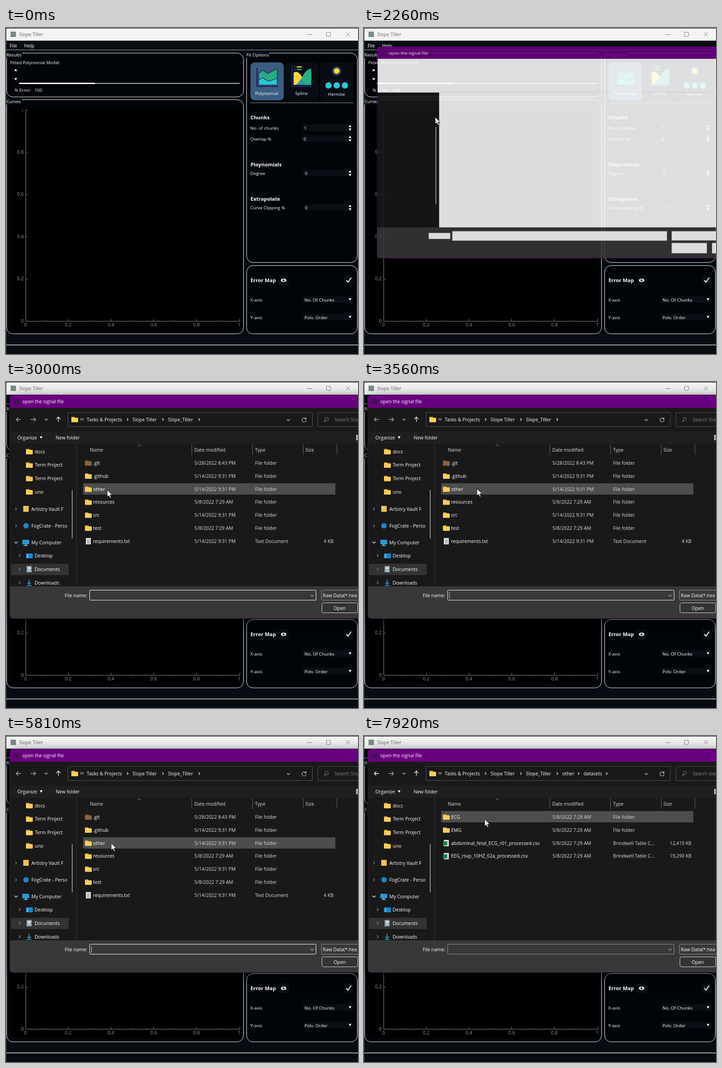
Animation, 776 px wide and 721 px high, one loop 8 s. Source, as an HTML page with a canvas:

```html
<!DOCTYPE html>
<html lang="en">
<head>
<meta charset="utf-8">
<title>Slope Tiller</title>
<style>
html, body { margin: 0; width: 100%; height: 100%; overflow: hidden; background: #080c13; }
canvas { display: block; }
</style>
</head>
<body>
<canvas id="stage" width="776" height="721"></canvas>
<script>
const ctx = document.getElementById('stage').getContext('2d');
const LOOP = 8000, WHITE = '#fff', PURPLE = '#69007f', APP = '#080c13', PANEL = '#010409';
const APP_NAME = 'Slope Tiller';
const clamp = v => Math.max(0, Math.min(1, v));

function rect(x, y, w, h, fill) { ctx.fillStyle = fill; ctx.fillRect(x, y, w, h); }

function round(x, y, w, h, r, fill, stroke) {
  ctx.beginPath();
  ctx.roundRect(x, y, w, h, r);
  if (fill) { ctx.fillStyle = fill; ctx.fill(); }
  if (stroke) { ctx.strokeStyle = stroke; ctx.lineWidth = 1; ctx.stroke(); }
}

function circle(x, y, r, fill) {
  ctx.beginPath();
  ctx.arc(x, y, r, 0, 7);
  ctx.fillStyle = fill;
  ctx.fill();
}

// Points come as a flat list: x, y, x, y, ...
function trace(points) {
  ctx.beginPath();
  for (let i = 0; i < points.length; i += 2) ctx.lineTo(points[i], points[i + 1]);
}
function line(points, color = WHITE, width = 1) {
  trace(points);
  ctx.strokeStyle = color;
  ctx.lineWidth = width;
  ctx.stroke();
}
function shape(points, fill) { trace(points); ctx.closePath(); ctx.fillStyle = fill; ctx.fill(); }

// y is the middle of the capitals
function text(str, x, y, size = 9.8, color = WHITE, align = 'left', weight = 500) {
  ctx.font = `${weight} ${size}px "Open Sans", "Noto Sans", sans-serif`;
  ctx.textAlign = align;
  ctx.fillStyle = color;
  ctx.fillText(str, x, Math.round(y + size * 0.36));
}
const label = (str, x, y, color = WHITE, align) => text(str, x, y, 10.4, color, align);

function triangle(x, y, up, r = 3) {
  const d = up ? -r : r;
  shape([x - r, y - d / 1.4, x + r, y - d / 1.4, x, y + d], WHITE);
}
const chevronRight = (x, y, color, r = 3) => line([x - r / 2, y - r, x + r / 2, y, x - r / 2, y + r], color, 1.2);
const chevronDown = (x, y, color, r = 3.5) => line([x - r, y - r / 2, x, y + r / 2, x + r, y - r / 2], color, 1.2);

/* ---------- main window ---------- */

function group(x, y, w, h, title, gap) {
  round(x + 0.5, y + 0.5, w, h, 14, PANEL, '#f0f0f0');
  if (!title) return;
  rect(x - 1, y - 1, gap, 12, APP);
  text(title, x, y + 4);
}

function heading(str, y) { text(str, 539, y, 11.3, WHITE, 'left', 700); }

function spin(name, value, x, y) {
  text(name, 538.5, y);
  round(x, y - 8, 766 - x, 15, 3, '#0a0f15');
  text(value, x + 4, y);
  triangle(758.5, y - 4, true);
  triangle(758.5, y + 3.5, false);
}

function combo(name, value, y) {
  text(name, 538.5, y);
  round(654, y - 8, 112, 15, 3, '#0a0f15');
  text(value, 658, y);
  triangle(758.5, y - 1, false);
}

function titleBar(focused) {
  const ink = focused ? WHITE : '#777';
  rect(0, 1, 776, 27, focused ? PURPLE : '#f3f3f3');
  rect(10, 8, 12, 12, focused ? '#3c1550' : '#7d8a8c');
  label(APP_NAME, 29, 14.5, focused ? WHITE : '#666');
  line([664, 14.5, 675, 14.5], ink);
  round(706.5, 9.5, 9, 9, 1, null, ink);
  line([749, 9.5, 758, 18.5], ink);
  line([758, 9.5, 749, 18.5], ink);
}

function polynomialIcon() {
  const navy = '#241c52';
  shape([557, 101, 565, 93, 577, 101, 598, 90, 598, 111, 579, 118, 566, 110, 557, 115], '#26ad83');
  shape([557, 115, 566, 110, 579, 118, 598, 111, 598, 126, 557, 126], '#27c8d2');
  line([557, 101, 565, 93, 577, 101, 598, 90, 598, 126, 557, 126, 557, 101], navy, 1.2);
  line([557, 115, 566, 110, 579, 118, 598, 111], navy, 1.2);
  line([553.5, 88, 553.5, 129, 600, 129], navy, 2.5);
}

function splineIcon() {
  ctx.beginPath();
  ctx.moveTo(634, 126);
  ctx.lineTo(634, 99);
  ctx.bezierCurveTo(644, 92, 652, 104, 661, 126);
  ctx.fillStyle = '#fdd835';
  ctx.fill();
  ctx.save();
  ctx.clip();
  ctx.restore();
  const hill = new Path2D('M636 126 C655 122 652 92 673 90 V126 Z');
  ctx.fillStyle = '#26ad83';
  ctx.fill(hill);
  shape([640, 126, 651, 112, 661, 126], '#2397b0');
  line([630.5, 84, 630.5, 129, 675, 129], '#2b2064', 2.5);
  [['#fdd835', 86], ['#26ad83', 92]].forEach(([color, y]) => {
    line([641, y, 652, y], color, 2.5);
    line([635, y, 638, y], '#55506f', 2.5);
  });
}

function hermiteIcon() {
  for (const x of [711, 729, 747]) line([729, 100, x, 122], '#12152c', 1.2);
  circle(729, 95, 10, '#31527c');
  circle(729, 95, 8, '#241c52');
  circle(729, 95, 6.5, '#fdd835');
  for (const x of [711, 729, 747]) {
    circle(x, 127, 7.5, '#17465b');
    circle(x, 127, 6.7, '#27c8d2');
  }
}

function fitButtons() {
  round(539, 76, 73.5, 84, 9, '#3b5d82');
  round(615, 76, 74, 84, 9, '#080d14');
  round(692.5, 76, 73.5, 84, 9, '#080d14');
  text('Polynomial', 574.5, 144, 9.8, WHITE, 'center');
  text('Spline', 651.5, 144, 9.8, WHITE, 'center');
  text('Hermite', 728.5, 146, 9.8, WHITE, 'center');
  polynomialIcon();
  splineIcon();
  hermiteIcon();
  line([539, 165.5, 766, 165.5], '#999');
}

function plot() {
  const axis = '#8c8c8c', ink = '#9a929c';
  rect(12, 179, 504, 488, '#000');
  line([48, 181.5, 43.5, 181.5, 43.5, 648.5, 515.5, 648.5, 515.5, 643], axis);
  for (let i = 1; i < 10; i++) {
    const x = Math.round(43 + 47 * i) + 0.5, y = Math.round(648 - 46.7 * i) + 0.5;
    const color = i % 2 ? '#3a3a3a' : '#777';
    line([43, y, i % 2 ? 46 : 48, y], color);
    line([x, 648, x, i % 2 ? 645 : 643], color);
  }
  for (let i = 0; i <= 4; i++) {
    const str = i ? '0.' + 2 * i : '0';
    text(str, 39, 648 - i * 93.5, 10.5, ink, 'right');
    text(str, 43 + i * 94.2, 656, 10.5, ink, 'center');
  }
  ctx.save();
  ctx.beginPath();
  ctx.rect(15, 180, 500, 480);
  ctx.clip();
  text('1', 39, 181.5, 10.5, ink, 'right');
  text('1', 514, 656, 10.5, ink, 'center');
  ctx.restore();
}

function mainWindow(focused, fileHover, menuAlpha) {
  rect(0, 0, 776, 721, APP);
  titleBar(focused);
  if (fileHover) rect(1, 29, 31, 19, WHITE);
  label('File', 8, 39);
  label('Help', 40, 39);
  line([0, 48.5, 776, 48.5], '#a8aaad');

  group(1, 55, 522, 97, 'Results', 36);
  text('Fitted Polynomial Model:', 9.5, 77, 9.5);
  triangle(21.5, 93, true);
  triangle(21.5, 113, false);
  rect(29, 121, 167, 3, WHITE);
  rect(196, 121, 319, 3, '#6b6d70');
  ctx.setLineDash([1, 1]);
  line([196, 122.5, 515, 122.5], '#d0d0d0');
  ctx.setLineDash([]);
  text('% Error:', 19, 137);
  text('100', 63, 137);

  group(1, 158, 522, 518, 'Curves', 35);
  plot();

  group(530, 55, 244, 463, 'Fit Options', 51);
  fitButtons();
  heading('Chunks', 197.5);
  spin('No. of chunks', '1', 653, 221);
  spin('Overlap %', '0', 652, 245);
  heading('Ploynomials', 301.5);
  spin('Degree', '0', 655, 321.5);
  heading('Extrapolate', 377.5);
  spin('Curve Clipping %', '0', 655, 397.5);

  group(530, 525, 244, 151);
  heading('Error Map', 558);
  round(600.5, 547, 23, 22, 3, '#0a0f15');
  ctx.beginPath();
  ctx.ellipse(612, 558, 6, 3.8, 0, 0, 7);
  ctx.fillStyle = WHITE;
  ctx.fill();
  circle(612, 558, 2.4, '#0a0f15');
  circle(612.8, 557.2, 0.9, WHITE);
  round(745, 547, 21, 21, 3, '#0a0f15');
  line([750, 558, 754, 562, 761, 552], WHITE, 2);
  combo('X-axis', 'No. Of Chunks', 601);
  combo('Y-axis', 'Polv. Order', 640);

  line([0, 701, 776, 701], '#d8d8d8', 1.5);
  line([0.5, 0, 0.5, 721], focused ? PURPLE : '#3a3d42');

  if (menuAlpha > 0) {
    ctx.globalAlpha = menuAlpha;
    rect(1, 49, 83, 26, APP);
    line([33, 48.5, 84, 48.5], '#333');
    label('Open', 20, 62);
    ctx.globalAlpha = 1;
  }
}

/* ---------- file dialog ---------- */

function folder(x, y, dim) {
  round(x, y - 6, 8, 5, 1, dim ? '#6e4a28' : '#e3a82b');
  round(x, y - 4, 15, 10, 1.5, dim ? '#8a6140' : '#fccf54');
}

function page(x, y) {
  rect(x, y - 7, 11, 14, '#e6e6e6');
  for (let i = -4; i < 6; i += 2) line([x + 2, y + i + 0.5, x + 9, y + i + 0.5], '#8c8c8c');
}

function sheet(x, y) {
  page(x + 2, y);
  rect(x, y - 4, 9, 9, '#17834a');
}

const SPRING = '5/14/2022 9:31 PM', EARLY = '5/8/2022 7:29 AM';
const dir = (name, date, dim) => ({ name, date, type: 'File folder', icon: (x, y) => folder(x, y, dim) });
const csv = (name, size) => ({ name, date: EARLY, type: 'Brindwell Table C...', size, icon: sheet });
const LISTINGS = [
  [dir('.git', '5/28/2022 8:43 PM', true), dir('.github', SPRING), dir('other', SPRING),
    dir('resources', EARLY), dir('src', SPRING), dir('test', EARLY),
    { name: 'requirements.txt', date: SPRING, type: 'Text Document', size: '4 KB', icon: (x, y) => page(x + 2, y) }],
  [dir('datasets', EARLY)],
  [dir('ECG', EARLY), dir('EMG', EARLY),
    csv('abdominal_fetal_ECG_r01_processed.csv', '12,419 KB'),
    csv('EEG_rsvp_10HZ_02a_processed.csv', '19,290 KB')]
];
const CRUMBS = [['Tasks & Projects', 178, 268], [APP_NAME, 279, 346], ['Slope_Tiller', 357, 426],
  ['other', 437, 473], ['datasets', 484, 535]];

function sidebar() {
  ctx.save();
  ctx.beginPath();
  ctx.rect(9, 137, 129, 315);
  ctx.clip();
  rect(11, 402, 127, 25, '#333');
  ['docs', 'Term Project', 'Term Project', 'uno'].forEach((name, i) => {
    folder(44, 154 + i * 29.7, false);
    label(name, 63.5, 154 + i * 29.7);
  });
  const gray = '#8a8a8a';
  chevronRight(22, 281, gray);
  chevronRight(22, 318, gray);
  chevronDown(22, 355, WHITE);
  for (const y of [384, 414, 444]) chevronRight(30, y, gray);

  rect(38, 274, 12, 13, '#f2c34e');
  label('Artistry Vault F', 56, 281);
  circle(44, 318, 6, '#1687d0');
  label('FogCrate - Perso', 56, 318);
  rect(36, 349, 15, 10, '#2b9ad6');
  rect(42, 359, 3, 2, '#79bfe3');
  rect(39, 361, 9, 1.5, '#79bfe3');
  label('My Computer', 56, 355);
  round(44, 379, 15, 11, 1, '#1b86c6');
  rect(46, 382, 3, 2, '#9bdcf7');
  rect(46, 386, 3, 2, '#9bdcf7');
  label('Desktop', 63, 384.5);
  rect(45.5, 407, 11, 14, '#93a9b8');
  rect(48, 410, 6, 3, '#e9f3f8');
  line([48, 416.5, 54, 416.5], WHITE);
  label('Documents', 63, 414.5);
  line([51, 437, 51, 447], '#35a6dc', 1.6);
  line([47, 443.5, 51, 447.5, 55, 443.5], '#35a6dc', 1.6);
  line([45.5, 450, 56.5, 450], '#35a6dc', 1.6);
  label('Downloads', 63, 444);
  ctx.restore();
  rect(145, 239, 2, 107, '#8c8c8c');
}

function addressBar(level) {
  const mute = '#888', back = level ? WHITE : '#aaa';
  line([33, 83, 22.5, 83], back, 1.3);
  line([27, 78.5, 22.5, 83, 27, 87.5], back, 1.3);
  line([54.5, 83, 65.5, 83], '#aaa', 1.3);
  line([61, 78.5, 65.5, 83, 61, 87.5], '#aaa', 1.3);
  chevronDown(88.5, 83, '#ccc');
  line([115.5, 88, 115.5, 77.5], WHITE, 1.3);
  line([111, 82, 115.5, 77.5, 120, 82], WHITE, 1.3);

  round(136.5, 67.5, 539, 31, 1, '#191919', '#555');
  folder(144, 83, false);
  chevronRight(165.5, 82.5, '#aaa', 2.5);
  chevronRight(169.5, 82.5, '#aaa', 2.5);
  CRUMBS.slice(0, 3 + level).forEach(([name, x, arrow]) => {
    label(name, x, 83);
    chevronRight(arrow, 83, WHITE, 2.7);
  });
  chevronDown(622.5, 84, '#ccc');
  ctx.beginPath();
  ctx.arc(657, 84, 4.5, 0, 5.3);
  ctx.strokeStyle = '#ddd';
  ctx.lineWidth = 1.2;
  ctx.stroke();
  shape([657.5, 82, 662, 82, 662, 78], '#ddd');

  round(687.5, 67.5, 110, 31, 1, '#191919', '#555');
  ctx.beginPath();
  ctx.arc(707, 82, 3.7, 0, 7);
  ctx.strokeStyle = mute;
  ctx.stroke();
  line([704.5, 85, 701, 89], mute, 1.2);
  label('Search ' + ['Slope_Tiller', 'other', 'datasets'][level], 724.5, 83, mute);
}

function fileList(level, pointer) {
  line([290.5, 141.5, 294, 138.5, 297.5, 141.5], '#999');
  [['Name', 185], ['Date modified', 415], ['Type', 549], ['Size', 660]].forEach(([name, x]) => label(name, x, 150, '#ddd'));
  for (const x of [409.5, 543.5, 655.5, 729.5]) line([x, 138, x, 161], '#666');
  LISTINGS[level].forEach((file, i) => {
    const y = 179.3 + i * 28.8;
    const over = pointer.x > 170 && pointer.x < 726 && Math.abs(pointer.y - y) < 13;
    if (over) rect(170, Math.round(y - 13), 556, 25, '#4d4d4d');
    file.icon(174, y);
    label(file.name, 192, y);
    label(file.date, 415.5, y, '#ddd');
    label(file.type, 549, y, '#ddd');
    if (file.size) label(file.size, 722, y, '#ddd', 'right');
  });
}

function dialogFooter(t) {
  rect(9, 452, 790, 71, '#383838');
  label('File name:', 179, 472, WHITE, 'right');
  round(184.5, 460.5, 499, 22, 1, '#383838', t < 6560 ? WHITE : '#999');
  if (t < 6560 && (t + 910) % 1060 < 530) line([188.5, 465, 188.5, 479], '#ccc');
  chevronDown(675, 472.5, '#aaa');
  round(695.5, 460.5, 110, 22, 1, '#383838', '#999');
  label('Raw Data(*.hea *.csv)', 698.5, 472);
  round(696.5, 488.5, 79, 22, 4, '#333', '#ddd');
  label('Open', 735.5, 500, WHITE, 'center');
}

// Unpainted controls shown while the dialog is opening; areas do not overlap, as the dialog is translucent
function dialogBlank() {
  const box = '#f7f7f7';
  rect(10, 57, 790, 79, WHITE);
  rect(153, 136, 647, 315, WHITE);
  rect(10, 136, 143, 315, '#191919');
  rect(145, 217, 1.5, 180, '#ddd');
  rect(9, 451, 790, 72, '#383838');
  rect(129, 464, 50, 14, box);
  rect(184, 460, 500, 22, box);
  rect(695, 460, 110, 21.5, box);
  rect(695, 487.5, 82, 24, box);
  rect(789, 487.5, 30, 24, box);
}

function dialog(t, pointer) {
  const scale = 1 - 0.055 * Math.exp((2260 - t) / 41);
  const level = t < 6210 ? 0 : t < 7300 ? 1 : 2;
  ctx.save();
  ctx.globalAlpha = t < 2300 ? clamp((t - 2170) / 105) : 1;
  ctx.translate(384, 264);
  ctx.scale(scale, scale);
  ctx.translate(-384, -264);
  if (t >= 2300) {
    ctx.shadowColor = 'rgba(0,0,0,.6)';
    ctx.shadowBlur = 28;
    ctx.shadowOffsetY = 6;
    round(8, 28.5, 800, 495, 8, '#191919');
    ctx.shadowColor = 'transparent';
  }
  ctx.beginPath();
  ctx.roundRect(8, 28.5, 800, 495, 8);
  ctx.clip();
  rect(8, 28, 800, 29, PURPLE);
  rect(18, 38, 11, 11, '#3c1550');
  label('open the signal file', 36, 43.5);
  if (t < 2300) dialogBlank();
  else {
    rect(8, 57, 800, 466, '#191919');
    rect(8, 109, 800, 28, '#1f1f1f');
    addressBar(level);
    label('Organize', 25, 123);
    triangle(77.5, 122.5, false);
    label('New folder', 109.5, 123);
    rect(772, 117, 20, 12, '#ccc');
    for (let y = 119; y < 129; y += 3) rect(774, y, 16, 1.3, '#333');
    line([155.5, 137, 155.5, 452], '#303030', 1.5);
    sidebar();
    fileList(level, pointer);
    dialogFooter(t);
  }
  round(8.5, 29, 800, 494, 8, null, t < 2300 ? PURPLE : '#4c1059');
  ctx.restore();
}

/* ---------- pointer ---------- */

const PATH = [[120, 706, 689], [820, 10, 34], [1100, 11, 34], [1500, 30, 57], [1980, 38, 62],
  [2260, 157, 197], [2380, 191, 234], [2720, 212, 240], [3490, 249, 236], [4020, 250, 236],
  [4360, 110, 238], [4570, 110, 238], [4910, 234, 238], [5050, 234, 238], [5330, 238, 206],
  [5470, 238, 206], [5810, 232, 237], [6890, 232, 237], [7200, 240, 186], [7400, 240, 186], [7720, 266, 184]];
const CLICKS = [[1020, 1130], [1650, 1800], [6210, 6330], [7230, 7360]];

function pointerAt(t) {
  const i = PATH.findIndex(k => k[0] > t);
  if (i < 1) return { x: 266, y: 184 };
  const [t0, x0, y0] = PATH[i - 1], [t1, x1, y1] = PATH[i];
  const u = (t - t0) / (t1 - t0), e = u * u * (3 - 2 * u);
  return { x: x0 + (x1 - x0) * e, y: y0 + (y1 - y0) * e };
}

function drawPointer({ x, y }, pressed) {
  if (pressed) circle(x, y, 11.5, 'rgba(255,240,60,.6)');
  ctx.save();
  ctx.translate(x, y);
  trace([0, 0, 0, 15.5, 3.6, 12.2, 6.2, 18, 8.6, 17, 6, 11.3, 11, 11.3]);
  ctx.closePath();
  ctx.fillStyle = WHITE;
  ctx.fill();
  ctx.strokeStyle = '#000';
  ctx.lineWidth = 0.8;
  ctx.stroke();
  ctx.restore();
}

function frame(now) {
  const t = now % LOOP;
  const pointer = pointerAt(t);
  const menu = t >= 1020 && t < 1850 ? clamp((t - 1060) / 120) : 0;
  mainWindow(t >= 1020 && t < 2170, t >= 800 && t < 1850, menu);
  if (t >= 2190) dialog(t, pointer);
  if (t >= 120) drawPointer(pointer, CLICKS.some(([a, b]) => t >= a && t < b));
  requestAnimationFrame(frame);
}
requestAnimationFrame(frame);
</script>
</body>
</html>
```
